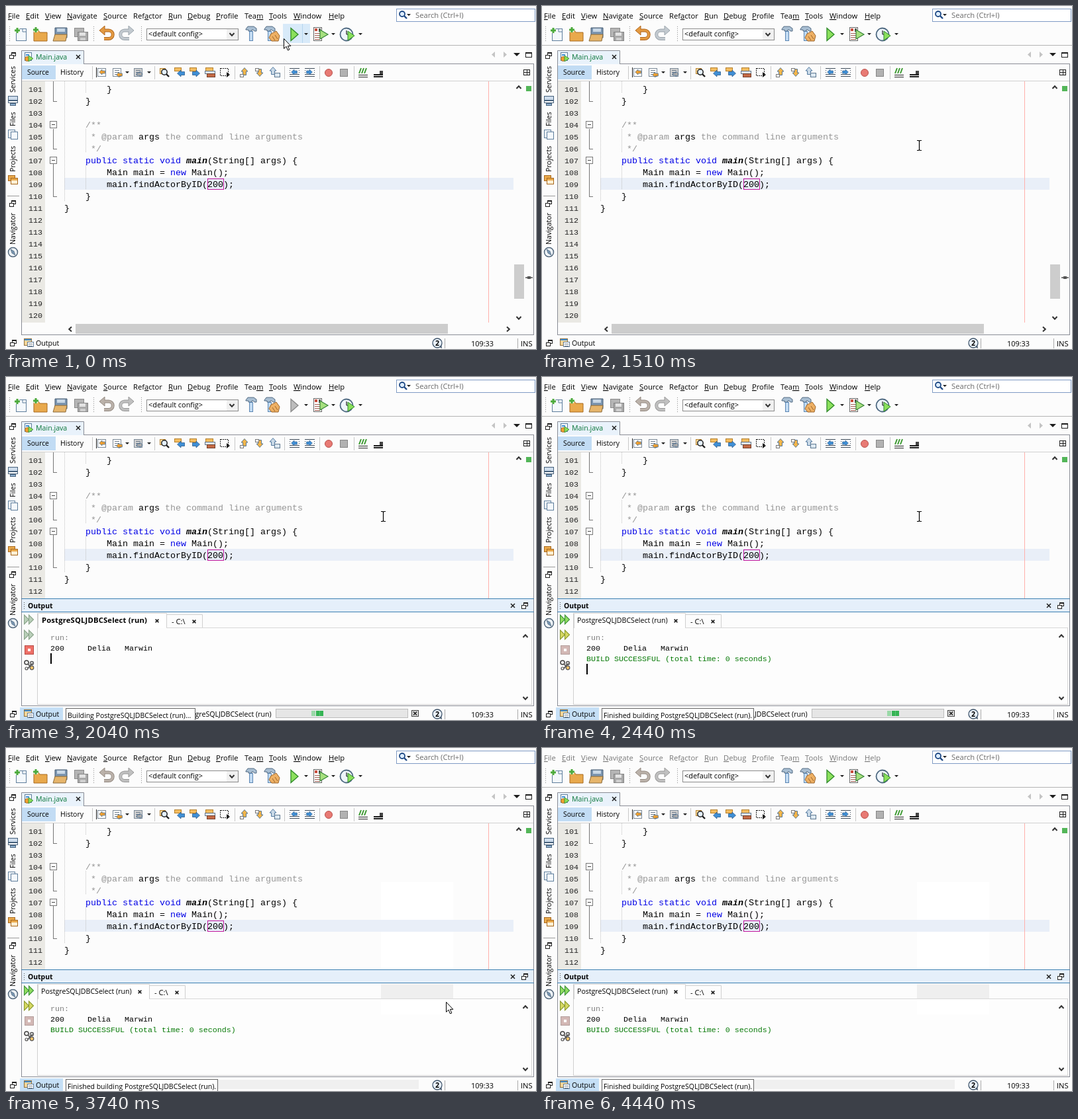
Recreate the animation shown at these times as an HTML page. Size 800 by 519 pixels, loop 4540 ms.

```html
<!DOCTYPE html>
<html lang="en">
<head>
<meta charset="utf-8">
<title>Run a Java program in the editor</title>
<style>
html, body { margin: 0; width: 100%; height: 100%; overflow: hidden; background: #fcfcfc; }
svg { display: block; width: 800px; height: 519px; }
text { white-space: pre; font-family: "Open Sans", "Noto Sans", sans-serif; }
.mono { font-family: "Liberation Mono", "Courier New", monospace; }
.u { text-decoration: underline; }
.doc { fill: #969696; }
.kw { fill: #0000e6; }
.crisp { shape-rendering: crispEdges; }
</style>
</head>
<body>
<svg id="stage" viewBox="0 0 800 519" xmlns="http://www.w3.org/2000/svg"></svg>
<script>
const LOOP = 4540;
const INK = '#1e1e1e', EDGE = '#898c95', FOCUS = '#3c7fb1', BLUE = '#3f8fd6', ORANGE = '#f0a030';

// Drawing helpers, each returning SVG markup
const rect = (x, y, w, h, fill, more = '') =>
  `<rect class="crisp" x="${x}" y="${y}" width="${w}" height="${h}" fill="${fill}" ${more}/>`;
const box = (x, y, w, h, fill, line) =>
  rect(x + .5, y + .5, w - 1, h - 1, fill, `stroke="${line}"`);
const path = (d, fill = 'none', line = 'none', w = 1) =>
  `<path d="${d}" fill="${fill}" stroke="${line}" stroke-width="${w}"/>`;
const disc = (x, y, r, fill, line = 'none', w = 1) =>
  `<circle cx="${x}" cy="${y}" r="${r}" fill="${fill}" stroke="${line}" stroke-width="${w}"/>`;
const text = (x, y, s, size = 10.6, more = '') =>
  `<text x="${x}" y="${y}" font-size="${size}" ${more}>${s}</text>`;
const mono = (x, y, s, size = 13.333, more = '') => text(x, y, s, size, `class="mono" ${more}`);
const group = (id, ...parts) => `<g id="${id}">${parts.join('')}</g>`;
const at = (x, y, s, turn = 0, size = 1) =>
  `<g transform="translate(${x} ${y}) rotate(${turn}) scale(${size})">${s}</g>`;
const dots = (x, y, h, c = '#b5b5b5', gap = 1) =>
  path(`M${x + .5} ${y}v${h}`, 'none', c).replace('/>', ` stroke-dasharray="1 ${gap}"/>`);
const vline = (x, y, h, c = '#c8c8c8') => rect(x, y, 1, h, c);
const hline = (x, y, w, c = '#c8c8c8') => rect(x, y, w, 1, c);
const drop = (x, y) => path(`M${x - 3} ${y - 1}h6l-3 3z`, INK);
const cross = (x, y, r = 3) =>
  path(`M${x - r} ${y - r}l${2 * r} ${2 * r}m0 ${-2 * r}l${-2 * r} ${2 * r}`, 'none', INK, 1.5);
const chevron = (x, y, turn) => at(x, y, path('M-3.5 2L0-1.8L3.5 2', 'none', '#333', 2), turn);
const restore = (x, y) => box(x - 2, y - 5, 7, 6, '#fff', INK) + hline(x - 2, y - 4, 7, INK) +
  box(x - 5, y - 1, 7, 6, '#fff', INK);
const arrow = (x, y, turn, fill = BLUE, size = 1) =>
  at(x, y, path('M-5.5 0L0-5V-2.5H5.5V2.5H0V5z', fill, '#2f5d8c', .8), turn, size);
const rows = (x, y, w, n, c = '#6c7a88') =>
  Array.from({ length: n }, (_, i) => hline(x, y + i * 3, w, c)).join('');

function menu() {
  const items = [[3, '_File'], [30, '_Edit'], [59, '_View'], [92, '_Navigate'], [147, '_Source'],
    [192, 'Ref_actor'], [245, '_Run'], [274, '_Debug'], [317, '_Profile'], [360, 'Tea_m'],
    [397, '_Tools'], [434, '_Window'], [487, '_Help']];
  return group('menu', ...items.map(([x, s]) =>
    text(x, 19, s.replace(/_(.)/, '<tspan class="u">$1</tspan>'), 11.2)));
}

const search = () => box(589, 4, 210, 20, '#fff', '#7f9bc4') +
  disc(598, 12, 4, '#dcecff', '#1f4a85', 1.8) + path('M601 15l4 4', 'none', '#1f4a85', 2.4) +
  drop(608, 13) + text(618, 18, 'Search (Ctrl+I)', 11.2, 'fill="#6b6b6b"');

const page = (x, y, w, h) => box(x, y, w, h, '#f4f8fc', '#5f7e9c');
const plus = (x, y) => path(`M${x - 4} ${y}h8M${x} ${y - 4}v8`, 'none', '#fff', 5) +
  path(`M${x - 4} ${y}h8M${x} ${y - 4}v8`, 'none', '#4caa3c', 3);
const play = (fill, line) => path('M430 33.5V52.5L441 43z', fill, line, 1.3);
const hammer = x => path(`M${x - 8} 35l3-4h9l4 3v4h-3l-2-2h-2v2h-5v-2h-4z`, '#a9bfd3', '#536b82') +
  box(x - 3, 38, 6, 15, '#c3dcf3', '#5b86b3');

// A hooked arrow pointing left, or right when flipped
function hook(x, flip, fill, line) {
  const arc = 'M-4-4H3a6 6 0 0 1 0 12.5H-4';
  return `<g transform="translate(${x} 41) scale(${flip} 1)">` + path(arc, 'none', line, 5) +
    path('M-11-4L-3-11V3z', fill, line, 1) + path(arc, 'none', fill, 3.2) + '</g>';
}

function toolbar() {
  return hline(0, 59, 800, '#b4b4b4') + [5, 132, 204].map(x => dots(x, 31, 24, '#888', 2)).join('') +
    page(15, 34, 16, 19) + path('M25 34v5h5', 'none', '#5f7e9c') + plus(17, 37) +
    path('M42 37h7l2 3h11v13h-20z', '#e9a94c', '#a8681d') + plus(45, 36) +
    path('M74 33h18v15h-18z', '#7b95b0', '#445a70') + rect(77, 34, 12, 5, '#c9d8e6') +
    path('M71 53l3-10h18l-2 10z', '#e6b56b', '#8b6b3a') +
    box(103, 33, 15, 14, '#b5b5b5', '#8c8c8c') + box(108, 39, 16, 14, '#a9a9a9', '#838383') +
    rect(111, 40, 9, 5, '#e2e2e2') + rect(112, 48, 8, 4, '#d0d0d0') +
    group('undoOn', hook(152, 1, '#e39a42', '#b0651c'), hook(182, -1, '#c3cad0', '#9aa3ab')) +
    group('undoOff', hook(152, 1, '#bbb2aa', '#948a82'), hook(182, -1, '#c0c0c0', '#989898')) +
    box(212, 34, 139, 18, '#fff', '#8a8a8a') + rect(333, 35, 17, 16, '#f0f0f0') + chevron(341, 43, 180) +
    text(215, 46, '&lt;default config&gt;', 10.9) +
    hammer(370) + hammer(398) + path('M400 42l8-4l5 7l-2 8h-10l-4-5z', '#eeb064', '#9b642a') +
    path('M402 46l4 6m0-8l4 6', 'none', '#9b642a') +
    group('hot', rect(418, 27, 41, 29, '#d8eaf9'), vline(447, 27, 29, '#b5d5ef')) +
    group('go', play('#8be05c', '#2f8a2a')) + group('wait', play('#bdbdbd', '#8a8a8a')) +
    drop(453, 42) +
    box(464, 32, 13, 21, '#fff', '#666') + rect(466, 34, 4, 4, '#c84a3a') + rect(472, 34, 3, 5, '#555') +
    rows(466, 41, 8, 4, '#a05a50') + path('M474 36V50L486 43z', '#a6e07e', '#38843a', 1.2) + drop(494, 42) +
    disc(514, 43, 9.5, '#eef5fb', '#4d6880', 1.8) + path('M514 43V37M514 43h5', 'none', INK, 1.2) +
    path('M516 38V52L526 45z', '#8be05c', '#2f8a2a') + drop(535, 42);
}

function rail() {
  const side = (y, s) => at(14, y, text(0, 0, s, 10.6), -90);
  return restore(10, 75) + side(131, 'Services') +
    box(3, 136, 15, 7, '#cddcec', '#48627c') + box(3, 143, 15, 4, '#fff', '#48627c') + box(6, 147, 9, 4, '#8fb0d0', '#48627c') +
    side(182, 'Files') + page(3, 187, 11, 13) + page(7, 190, 11, 12) +
    side(251, 'Projects') + box(3, 256, 11, 9, '#e9a94c', '#a8681d') + box(7, 260, 11, 10, '#fff0d5', '#a8681d') + rect(8, 261, 9, 3, '#e9a94c') +
    hline(2, 287, 18, '#999') + restore(10, 299) + side(361, 'Navigator') +
    disc(10.5, 372.5, 7, '#eef3f7', '#52677b', 1.5) + path('M7 368l5 3l2 6l-5-3z', '#7896b2', '#52677b', .7);
}

function tabs() {
  return path('M23.5 88V67.5H117.5V88', '#e9f2fb', EDGE) + hline(118, 87, 679, EDGE) +
    page(28, 70, 11, 13) + rect(30, 73, 5, 2, BLUE) + disc(32, 80, 3.5, ORANGE, '#9b642a', .8) +
    path('M34 75v9l7-4.5z', '#8be05c', '#2f8a2a', .8) +
    text(45, 81, 'Main.java', 10.6, 'fill="#087538"') + cross(109, 77) +
    path('M738 69v9l-5-4.5z', '#c4c4c4') + path('M751 69v9l5-4.5z', '#c4c4c4') +
    path('M766 71h10l-5 5z', INK) + box(784, 70, 10, 8, '#fff', INK) + hline(784, 71, 10, INK);
}

function editorBar() {
  const sheet = (x, c = '#fff') => box(x - 7, 94, 13, 13, c, '#7a8896') + rows(x - 4, 97, 7, 3);
  const shift = (x, turn) => rows(x - 7, 94, 15, 5, '#3f4c5a') + rect(x - 6, 97, 13, 6, '#fcfcfc') +
    arrow(x, 100, turn, BLUE, .8);
  return rect(24, 90, 51, 21, '#c2dcf4') + text(32, 104, 'Source', 10.3) + text(82, 104, 'History', 10.5) +
    [130, 224, 345, 420, 473, 525].map(x => vline(x, 91, 20)).join('') +
    box(138, 94, 13, 13, '#fff', '#7a8896') + vline(136, 93, 15, INK) + arrow(145, 100, 0, ORANGE, .8) +
    sheet(168) + arrow(171, 104, 0, ORANGE, .8) + drop(183, 100) +
    sheet(200, '#d2d2d2') + arrow(202, 103, 180, '#aaa', .8) + drop(216, 100) +
    box(232, 94, 9, 9, '#ffe2a6', '#b6812d') + disc(239, 100, 4.2, '#e4f1ff', INK, 1.5) + path('M242 103l4 4', 'none', INK, 2.4) +
    [262, 285].map((x, i) => box(x - 8, 93, 11, 6, '#f4bd60', '#b6812d') + arrow(x + 2, 102, i * 180)).join('') +
    box(301, 93, 12, 6, '#f4bd60', '#b6812d') + box(300, 98, 16, 5, '#dfe6ec', '#64788c') + box(303, 102, 13, 6, '#c46a45', '#73412f') +
    rect(323.5, 94.5, 12, 11, 'none', `stroke="${INK}" stroke-dasharray="2 1"`) + path('M333 100v8l5-4z', INK) +
    arrow(360, 99, 90, '#f6b549') + box(353, 103, 6, 5, '#fff', '#777') +
    arrow(383, 101, 270, '#f6b549') + box(376, 94, 6, 5, '#fff', '#777') +
    arrow(403, 98, 90, '#c9d9e7') + box(405, 101, 9, 7, '#dce8f2', '#5d7890') +
    shift(435, 0) + shift(458, 180) +
    disc(487, 101, 5.5, '#e87a74', '#b8504c') + box(504, 95, 12, 12, '#b2b2b2', '#858585') +
    path('M533 102l3-8m1 8l3-8m1 8l3-8', 'none', '#3d9a32', 2) + rows(532, 104, 14, 2, INK) +
    rect(555, 103, 14, 2, INK) + rect(555, 106, 14, 2, INK) + rect(564, 98, 5, 5, '#444') +
    box(781, 96, 10, 9, '#fff', INK) + hline(781, 100, 10, INK) + vline(786, 96, 9, INK);
}

const base = n => 130 + 18 * (n - 101);
const numbers = (from, to) => Array.from({ length: to - from + 1 }, (_, i) =>
  mono(34, base(from + i), from + i, 11.67, 'fill="#222"')).join('');

function editor() {
  const kw = s => `<tspan class="kw">${s}</tspan>`;
  const code = [[101, 8, '}'], [102, 4, '}'],
    [104, 4, '<tspan class="doc">/**</tspan>'],
    [105, 5, '<tspan class="doc">* @param <tspan fill="#000">args</tspan> the command line arguments</tspan>'],
    [106, 5, '<tspan class="doc">*/</tspan>'],
    [107, 4, `${kw('public static void')} <tspan font-weight="bold" font-style="italic">main</tspan>(String[] args) {`],
    [108, 8, `Main main = ${kw('new')} Main();`],
    [109, 8, 'main.findActorByID(200);'], [110, 4, '}'], [111, 0, '}']];
  const fold = (y, h) => vline(71, y, h, '#777') + hline(71, y + h, 6, '#777');
  const knob = y => box(66, y - 6, 11, 11, '#fff', '#777') + hline(69, y - 1, 5, '#444');
  return hline(24, 113, 772, '#d0d0d0') + group('ghost',
      rect(566, 203, 109, 57, '#fff'), rect(566, 278, 109, 57, '#fff')) +
    rect(88, 260, 678, 18, '#e9eff8') + rect(24, 114, 35, 383, '#eae9e4') +
    fold(114, 30) + fold(186, 30) + fold(239, 49) + knob(180) + knob(234) +
    dots(88, 114, 182, '#c3c3c3') + [[114, 18], [186, 36], [240, 38]].map(([y, h]) => dots(120, y, h, '#c3c3c3')).join('') +
    numbers(101, 112) + code.map(([n, col, s]) => mono(88 + col * 8, base(n), s)).join('') +
    box(304, 261, 25, 17, 'none', '#c0149c') + vline(728, 114, 383, '#ffb0ac') +
    chevron(774, 123, 0) + rect(785, 121, 8, 8, '#53b658');
}

const tall = () => group('tall', numbers(113, 120),
  rect(767, 391, 15, 52, '#cdcdcd'), chevron(774, 472, 180),
  rect(784, 410, 11, 2, '#777'), rect(787, 409, 5, 4, '#555'),
  rect(24, 479, 772, 18, '#fcfcfc'), rect(105, 481, 562, 15, '#cdcdcd'),
  chevron(97, 489, 270), chevron(758, 489, 90));

function status() {
  return group('pressed', rect(21, 500, 65, 19, '#c5dff6')) + restore(11, 510) +
    box(27, 503, 12, 11, '#f5d79a', '#91703c') + rect(28, 504, 10, 2, BLUE) + box(32, 508, 10, 8, '#fff', '#637d98') + rows(34, 511, 6, 2) +
    text(45, 514, 'Output', 10.6) +
    path('M652 515l6 3l-1-6z', '#41566c') + disc(651, 510, 7, '#e9f1fa', '#41566c', 1.3) +
    text(648, 514, '2', 10.6, 'font-weight="bold"') +
    vline(662, 503, 15, '#aaa') + text(702, 515, '109:33', 10.9) + vline(772, 503, 15, '#aaa') + text(777, 515, 'INS', 11.2);
}

function panel() {
  const name = 'PostgreSQLJDBCSelect (run)';
  const heads = (w, label) => path(`M48.5 380V357.5H${48 + w}.5V380`, '#fff', '#d0d0d0') +
    path(`M${48 + w}.5 379.5V359.5H${102 + w}.5V379.5`, '#fcfcfc', '#d0d0d0') + hline(48 + w, 379, 746 - w, '#d8d8d8') +
    label + cross(w + 34, 369, 2.4) + text(w + 56, 374, '- C:\\', 11.2) + cross(w + 90, 370, 2.4);
  const skip = (y, c, e) => path(`M27.5 ${y - 7}v14l7-7zM34.5 ${y - 7}v14l7-7z`, c, e, 1.1);
  const stop = (c, e) => box(28, 406, 14, 14, c, e) + rect(33, 411, 4, 4, '#fff');
  const tip = (w, s) => box(90, 501, w, 19, '#fff', '#666') + text(93, 516, s, 10.5);
  return group('panel',
    rect(24, 335, 772, 162, '#fcfcfc'), rect(24, 336, 772, 20, '#e5effa'), hline(23, 335, 774, FOCUS), hline(23, 355, 774, FOCUS),
    dots(27, 341, 11, '#555', 2), text(33, 350, 'Output', 10.4, 'font-weight="bold"'), cross(765, 346), restore(783, 346),
    rect(48, 380, 746, 115, '#fdfdfd'), vline(47, 357, 139, '#d0d0d0'), vline(793, 380, 115, '#d8d8d8'), hline(47, 495, 747, '#d0d0d0'),
    group('ghost2', rect(566, 357, 109, 22, '#efefef'), rect(566, 380, 109, 23, '#fff')),
    chevron(784, 392, 0), chevron(784, 486, 180),
    disc(31, 432, 3, '#fff', '#444', 1.6), disc(39, 433, 2.5, '#fff', '#555', 1.3), path('M32 442l8-9M33 434l7 8', 'none', '#555', 1.8),
    disc(39, 440, 2.8, '#f4c56c', '#555', 1.2), disc(31, 441, 2, '#fff', '#555', 1.2),
    mono(67, 398, 'run:', 11.67, 'fill="#808080"'),
    group('row', mono(67, 414, '200     Delia   Marwin', 11.67)),
    group('bar', text(264, 514, name, 10.6), box(407, 502, 200, 14, '#e6e6e6', '#bcbcbc'),
      box(612, 504, 11, 10, '#ddd', '#444'), cross(617.5, 509, 2.5),
      group('block', rect(0, 505, 6, 8, '#9ad9a8'), rect(7, 505, 11, 8, '#35b454'), vline(12, 505, 8, '#5cc676'))),
    group('blank', rect(320, 502, 303, 14, '#f0f0f0')),
    group('busy', heads(194, text(54, 372, name, 11.2, 'font-weight="bold" letter-spacing=".2"')),
      skip(367, '#b9cfb9', '#8aa48a'), skip(390, '#b9cfb9', '#8aa48a'), stop('#ee7068', '#b84a45'),
      tip(196, `Building ${name}...`)),
    group('done', heads(168, text(53, 372, name)),
      skip(367, '#8fdc60', '#3b9238'), skip(390, '#d6d862', '#8a9a2c'), stop('#d3b8b5', '#b29c9a'),
      mono(67, 430, 'BUILD SUCCESSFUL (total time: 0 seconds)', 11.67, 'fill="#087a08"'),
      tip(230, `Finished building ${name}.`)),
    group('outCaret', rect(67, 386, 2, 16, '#000')));
}

const pointers = () =>
  group('ring', disc(423.5, 48, 9.5, '#fdfdfdd8', '#333', 1.2)) +
  group('arrow', path('M.5.5V15.5L4 12.2L6.4 18L8.8 17L6.4 11.4H10.8z', '#fff', '#000')) +
  group('beam', path('M566 203.5h2.5l1 1l1-1h2.5M566 218.5h2.5l1-1l1 1h2.5M569.5 204v14', 'none', '#000', 1.2));

document.getElementById('stage').innerHTML =
  rect(0, 0, 800, 519, '#fcfcfc') + menu() + search() + toolbar() + rail() + tabs() + editorBar() +
  editor() + tall() + group('caret', rect(344, 260, 2, 17, '#000')) +
  vline(23, 88, 410, EDGE) + vline(796, 88, 410, EDGE) + hline(23, 497, 774, EDGE) +
  status() + panel() + pointers();

// Hold each value until the next step
function steps(id, prop, list) {
  const frames = list.map(([t, v]) => ({ offset: t / LOOP, [prop]: v, easing: 'steps(1, end)' }));
  frames.push({ offset: 1, [prop]: list[list.length - 1][1] });
  document.getElementById(id).animate(frames, { duration: LOOP, iterations: Infinity });
}

// Times alternate between shown and hidden
function show(id, ...times) {
  const list = times.map((t, i) => [t, i % 2 ? 0 : 1]);
  if (times[0] > 0) list.unshift([0, 0]);
  steps(id, 'opacity', list);
}
const move = (id, list) => steps(id, 'transform', list.map(([t, x, y]) => [t, `translate(${x}px, ${y}px)`]));

show('caret', 150, 400, 690, 1510);
show('hot', 0, 1510);
show('ring', 960, 1090);
show('arrow', 0, 1510, 3740, 4140);
show('beam', 1510, 3740);
show('tall', 0, 1650);
show('undoOn', 0, 1650);
show('undoOff', 1650);
show('go', 0, 1650, 2160);
show('wait', 1650, 2160);
show('pressed', 1650);
show('panel', 1650);
show('busy', 1650, 2160);
show('row', 2040);
show('done', 2160);
show('bar', 1650, 2600);
show('blank', 2600);
show('outCaret', 1650, 2740, 3170, 3590, 4140, 4440);
show('ghost', 3740);
show('ghost2', 3740);
move('arrow', [[0, 419, 49], [150, 422, 47], [1090, 528, 169], [1230, 568, 210],
  [3740, 664, 384], [3865, 719, 432], [3990, 728, 476]]);
move('block', [[0, 411, 0], [1770, 431, 0], [1920, 451, 0], [2040, 461, 0], [2160, 481, 0], [2280, 501, 0], [2440, 521, 0]]);
move('outCaret', [[0, 0, 0], [2040, 0, 32], [2160, 0, 48]]);
steps('menu', 'fill', [[0, '#000'], [4440, '#777']]);
</script>
</body>
</html>
```
